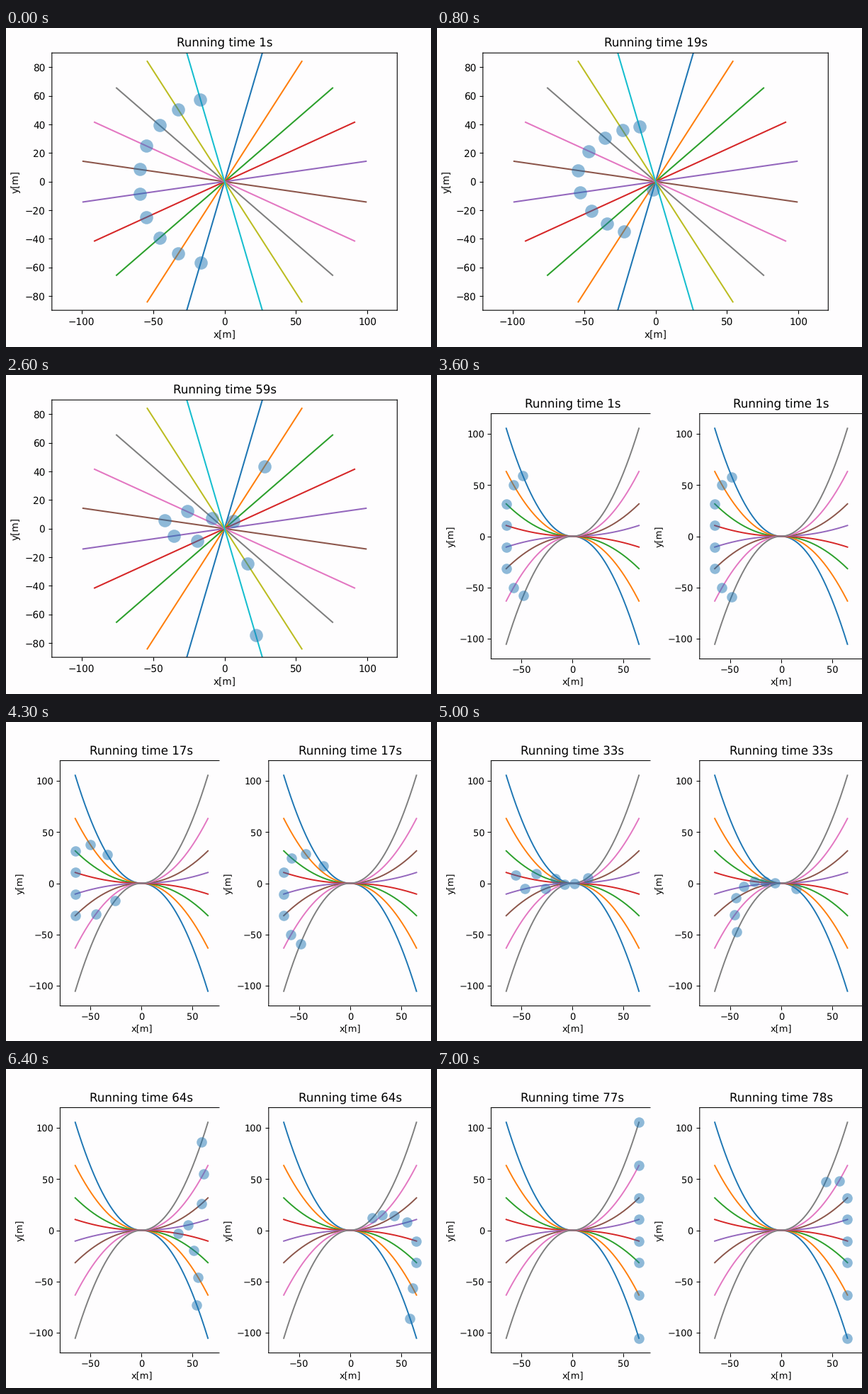
Write a matplotlib script that moves like this. It is 600 px wide and 450 px high and loops after 7.1 s.

```python
import numpy as np
import matplotlib.pyplot as plt
from matplotlib.animation import FuncAnimation

W, H, DPI = 600, 450, 100
FRAMES, SWITCH = 71, 36
RATE = 2.24      # simulated seconds per frame
SPEED = 3.0      # cruising speed in m/s
PAPER = "#fefdfe"

# Unhinted text and unsnapped lines keep sub-pixel sizes
plt.rcParams.update({"font.family": "DejaVu Sans", "text.hinting": "none",
                     "path.snap": False, "axes.facecolor": PAPER})
fig = plt.figure(figsize=(W / DPI, H / DPI), dpi=DPI, facecolor=PAPER)


def make_axes(left, top, right, bottom, scale, xlim, ylim, xticks, yticks):
    """Axes placed by stage pixels, with all text and lines scaled."""
    ax = fig.add_axes([left / W, 1 - bottom / H,
                       (right - left) / W, (bottom - top) / H])
    ax.set(xlim=(-xlim, xlim), ylim=(-ylim, ylim), xticks=xticks, yticks=yticks)
    ax.tick_params(labelsize=10 * scale, length=3.5 * scale,
                   width=0.8 * scale, pad=3.5 * scale)
    ax.set_xlabel("x[m]", fontsize=10 * scale, labelpad=4 * scale)
    ax.set_ylabel("y[m]", fontsize=10 * scale, labelpad=4 * scale)
    ax.set_title("", fontsize=12 * scale, pad=6 * scale)
    for spine in ax.spines.values():
        spine.set_linewidth(0.8 * scale)
    return ax


def alternate(n):
    """Indices taken in turn from both ends: 0, n-1, 1, n-2, ..."""
    return [n - 1 - i // 2 if i % 2 else i // 2 for i in range(n)]


def travelled(t, lag, crawl=0.0):
    """Distance covered: a slow crawl that blends into cruising."""
    w = 1.5
    return w * np.logaddexp(crawl / w, (SPEED * t - lag) / w)


class Panel:
    """A set of paths with one vehicle on each."""

    def __init__(self, ax, paths, order, offset, start, size, scale):
        self.ax, self.order = ax, order
        self.offset, self.start = offset, start
        self.paths = []
        for i, (x, y) in enumerate(paths):
            ax.plot(x, y, color=f"C{i}", lw=1.5 * scale)
            s = np.r_[0, np.cumsum(np.hypot(np.diff(x), np.diff(y)))]
            self.paths.append((s - s[-1] / 2, x, y))
        self.dots = [ax.plot([], [], "o", color="C0", alpha=0.5, ms=size,
                             mew=0, zorder=3)[0] for _ in order]

    def update(self, k, distance):
        t = int(RATE * k + self.offset)
        self.ax.set_title(f"Running time {t + 1}s")
        s = self.start + distance(t)
        for dot, line, pos in zip(self.dots, self.order, s):
            arc, x, y = self.paths[line]
            dot.set_data([np.interp(pos, arc, x)], [np.interp(pos, arc, y)])


# Ten straight roads through one crossing
angles = np.pi / 2 - np.arange(1, 11) * np.pi / 11
r = np.linspace(-100, 100, 201)
star_ax = make_axes(64.8, 35.2, 552.3, 398.2, 0.982, 120.8, 90,
                    range(-100, 101, 50), range(-80, 81, 20))
star = Panel(star_ax, [(r * np.cos(a), r * np.sin(a)) for a in angles],
             alternate(10), 0.4, -60, 13.4, 0.982)


def star_distance(t):
    """Later vehicles crawl more slowly and set off later."""
    i = np.arange(10)
    lag = 20 * i + 26 * (1 - np.exp(-i))
    crawl = 43 * np.exp(-(i / 7.6) ** 2) * (t / 36) ** 1.1
    return travelled(t, lag, crawl)


# Eight curved roads, shown twice with different crossing orders
x = np.linspace(-65, 65, 401)
ranks = [k for k in range(4, -5, -1) if k]
curves = [(x, -0.00125 * k * (abs(k) + 1) * x * np.abs(x)) for k in ranks]


def curve_panel(centre, order, offset):
    ax = make_axes(centre - 115, 54.5, centre + 115, 400.5, 0.935,
                   79.8, 120, [-50, 0, 50], range(-100, 101, 50))
    ax.spines["right"].set_visible(False)
    return Panel(ax, curves, order, offset, -80, 10.5, 0.935)


left = curve_panel(191.4, alternate(8)[::-1] and [7 - i for i in alternate(8)],
                   0.65)
right = curve_panel(485.8, range(8), 0.9)
for side in ("top", "bottom"):
    left.ax.spines[side].set_bounds(-79.8, 76)


def platoon(t, first, gap):
    """A leader, a wider first gap, then evenly spaced followers."""
    return travelled(t, np.r_[0, first + gap * np.arange(7)])


def draw(k):
    first = k < SWITCH
    star.ax.set_visible(first)
    left.ax.set_visible(not first)
    right.ax.set_visible(not first)
    if first:
        star.update(k, star_distance)
    else:
        left.update(k - SWITCH, lambda t: platoon(t, 14, 9.8))
        right.update(k - SWITCH, lambda t: platoon(t, 22, 10.25))
    return []


anim = FuncAnimation(fig, draw, frames=FRAMES, interval=100,
                     repeat=True, repeat_delay=0, blit=False)
plt.show()
```
